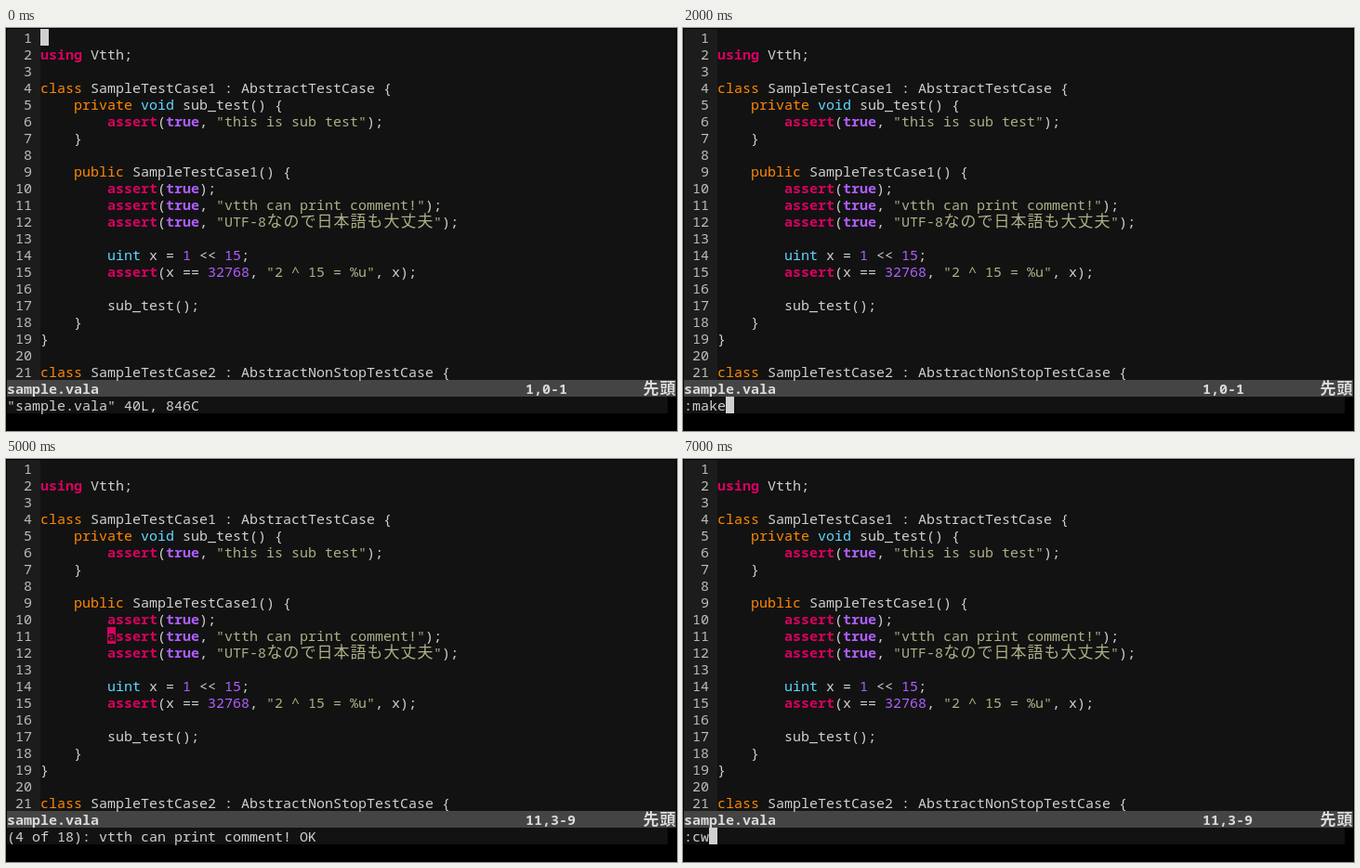
Animation, 722 px wide and 434 px high, one loop 8 s. Source, as an HTML page:

```html
<!DOCTYPE html>
<html lang="ja">
<head>
<meta charset="utf-8">
<title>Editor session</title>
<style>
html, body { margin: 0; width: 100%; height: 100%; overflow: hidden; background: #000; }
#stage { position: absolute; left: 0; top: 0; width: 722px; height: 434px; overflow: hidden; background: #000;
  font: 15px/18px "Noto Sans Mono", "DejaVu Sans Mono", monospace; font-variant-ligatures: none; color: #d0d0d0; }
#stage div { position: absolute; }
.row { height: 18px; white-space: pre; }
.wide { display: inline-block; width: 18px; line-height: 0; text-align: center; font-style: normal;
  font-family: "Noto Sans CJK JP", "Noto Sans CJK", sans-serif; font-size: 17px; }
.area { left: 1px; top: 1px; width: 720px; height: 378px; background: #121212; }
.gutter { left: 1px; top: 1px; width: 36px; height: 378px; background: #1c1c1c; }
.status { left: 1px; top: 379px; width: 720px; height: 18px; background: #444; }
.prompt { left: 1px; top: 397px; width: 711px; height: 18px; background: #121212; }
.num { color: #bcbcbc; }
.bold { font-weight: bold; color: #dadada; }
.key { color: #d7005f; font-weight: bold; }
.decl { color: #ff8700; }
.type { color: #5fd7ff; }
.bool { color: #af5fff; font-weight: bold; }
.int { color: #af5fff; }
.str { color: #afaf87; }
.cursor { width: 9px; height: 18px; background: #d0d0d0; }
.hot { background: #d7005f; color: #121212; font-weight: bold; }
.shell { left: 0; top: 0; width: 722px; height: 434px; background: #000; color: #b2b2b2; }
.shell .cursor { background: #b2b2b2; }
.scene { left: 0; top: 0; visibility: hidden; animation: show 8s step-end infinite; }
@keyframes show {
  0% { visibility: visible; }
  12.5%, 100% { visibility: hidden; }
}
</style>
</head>
<body>
<div id="stage">
  <div class="area"></div>
  <div class="gutter"></div>
  <div class="status"></div>
  <div class="prompt"></div>
</div>
<script>
const CODE = `
using Vtth;

class SampleTestCase1 : AbstractTestCase {
    private void sub_test() {
        assert(true, "this is sub test");
    }

    public SampleTestCase1() {
        assert(true);
        assert(true, "vtth can print comment!");
        assert(true, "UTF-8なので日本語も大丈夫");

        uint x = 1 << 15;
        assert(x == 32768, "2 ^ 15 = %u", x);

        sub_test();
    }
}

class SampleTestCase2 : AbstractNonStopTestCase {`;

const PAUSE = '続けるにはENTERを押すかコマンドを入力してください';
const OUTPUT = `${PAUSE}
minori@KTR-482jp:~/src/vtth$ vim sample.vala

./sample
/case1:
(non message assertion) OK
sample.vala:11: vtth can print comment! OK
sample.vala:12: UTF-8なので日本語も大丈夫 OK
sample.vala:15: 2 ^ 15 = 32768 OK
sample.vala:6: this is sub test OK
[REPORT] OK:5, NG:0, Total:5
OK
/case2:
(non message assertion) OK
(non message assertion) NG
sample.vala:25: can print message with source code position
sample.vala:26: message of true OK
sample.vala:27: message of false NG
[REPORT] OK:2, NG:2, Total:4
OK
/case3: OK

${PAUSE}`;

const stage = document.getElementById('stage');
const STATUS = 21, PROMPT = 22;

const escapeHtml = s => s.replace(/&/g, '&amp;').replace(/</g, '&lt;');
const widen = s => s.replace(/[\u3040-\u30ff\u4e00-\u9fff]/g, '<i class="wide">$&</i>');
const plain = s => widen(escapeHtml(s));

const TOKEN = /(?<str>"[^"]*")|\b(?:(?<key>using|assert)|(?<decl>class|private|public)|(?<type>void|uint)|(?<bool>true)|(?<int>\d+))\b/g;

function highlight(line) {
  let html = '', end = 0;
  for (const m of line.matchAll(TOKEN)) {
    const kind = Object.keys(m.groups).find(k => m.groups[k]);
    html += plain(line.slice(end, m.index)) + `<span class="${kind}">${plain(m[0])}</span>`;
    end = m.index + m[0].length;
  }
  return html + plain(line.slice(end));
}

function add(parent, cls) {
  const el = document.createElement('div');
  el.className = cls;
  parent.append(el);
  return el;
}

// Put html on the 9 x 18 character grid
function put(parent, col, row, html, cls = '') {
  const el = add(parent, 'row ' + cls);
  el.style.left = 1 + col * 9 + 'px';
  el.style.top = 1 + row * 18 + 'px';
  el.innerHTML = html;
}

function scene(second, cls = '') {
  const el = add(stage, 'scene ' + cls);
  el.style.animationDelay = second - 8 + 's';
  return el;
}

function editor(second, pos, text, typing) {
  const el = scene(second);
  put(el, 62, STATUS, pos, 'bold');
  put(el, 0, PROMPT, plain(text));
  if (typing) put(el, text.length, PROMPT, '', 'cursor');
  return el;
}

CODE.split('\n').forEach((line, i) => {
  put(stage, 0, i, String(i + 1).padStart(3), 'num');
  put(stage, 4, i, highlight(line));
});
put(stage, 0, STATUS, 'sample.vala', 'bold');
put(stage, 76, STATUS, plain('先頭'), 'bold');

put(editor(0, '1,0-1', '"sample.vala" 40L, 846C'), 4, 0, '', 'cursor');
editor(1, '1,0-1', ':', true);
editor(2, '1,0-1', ':make', true);
editor(3, '1,0-1', ':make check', true);

const shell = scene(4, 'shell');
OUTPUT.split('\n').forEach((line, i) => put(shell, 0, i, plain(line)));
put(shell, 49, PROMPT, '', 'cursor');

put(editor(5, '11,3-9', '(4 of 18): vtth can print comment! OK'), 12, 10, 'a', 'cursor hot');
editor(6, '11,3-9', ':', true);
editor(7, '11,3-9', ':cw', true);
</script>
</body>
</html>
```
